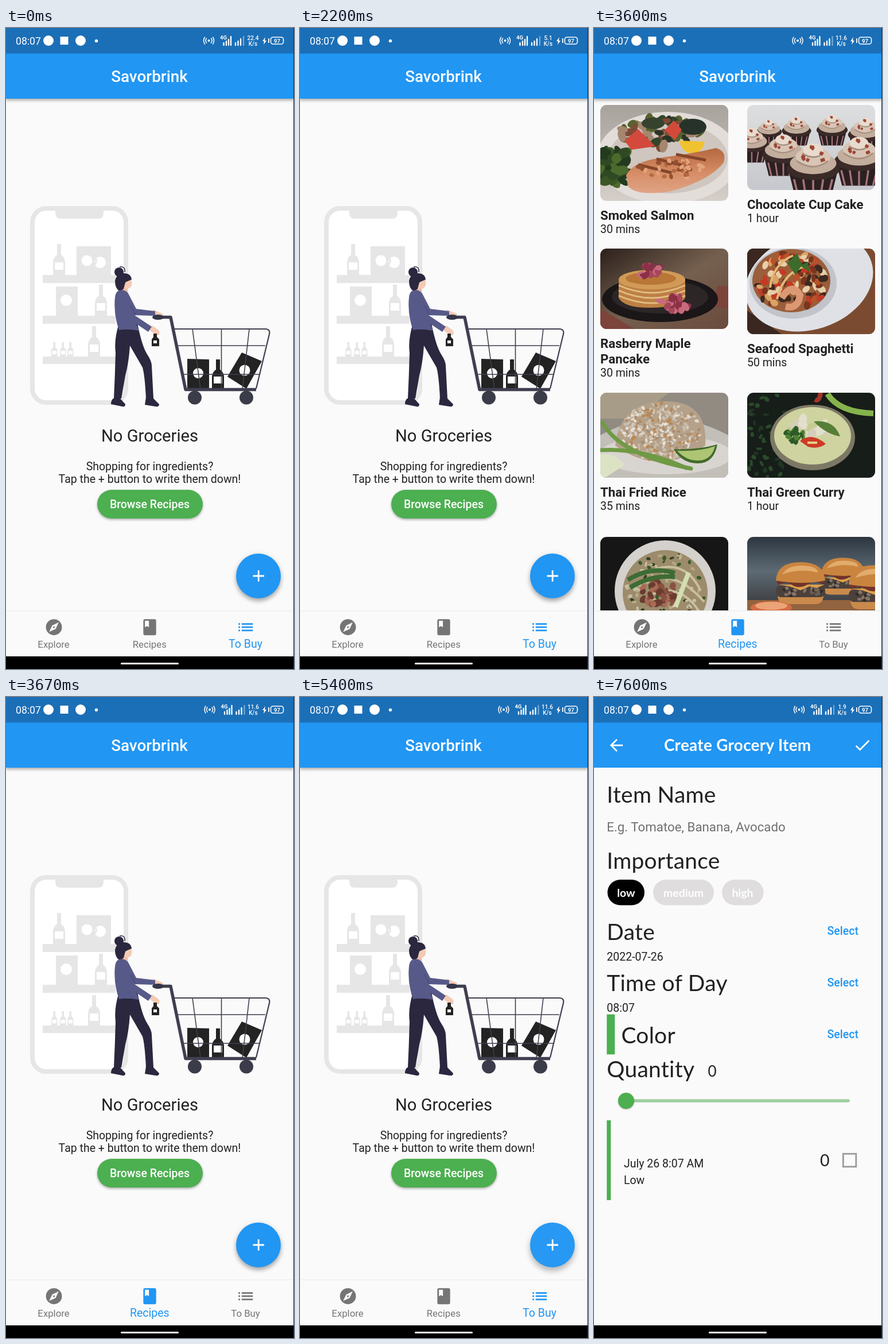
Recreate the animation shown at these times as an HTML page. Size 502x1116 px, loop 8 s.

```html
<!DOCTYPE html>
<html lang="en">
<head>
<meta charset="utf-8">
<title>Grocery app</title>
<style>
html, body { margin: 0; width: 100%; height: 100%; overflow: hidden; background: #fafafa; }
#stage { position: absolute; left: 0; top: 0; width: 502px; height: 1116px; overflow: hidden; background: #fafafa; font-family: Roboto, sans-serif; }
#stage > *, .layer > * { position: absolute; }
.layer { left: 0; top: 0; width: 502px; height: 1116px; }
svg { display: block; }
text { fill: #212121; font-size: 19.5px; }
.mid { text-anchor: middle; }
.med { font-weight: 500; }
.white { fill: #fff; }
.card { border-radius: 11px; }
.dish { font-size: 22.3px; font-weight: 700; }
.lato text, text.lato { font-family: Lato, sans-serif; }
.head text { font-size: 39px; letter-spacing: .25px; }
.chips text { font-weight: 700; fill: #fff; }
.bar { left: 0; top: 44px; width: 502px; height: 78.6px; background: #2196f3; }
#home { background: #fafafa; }

/* Timeline */
#home, #form, .speed, #signal, .nav, .nav text { animation: 8s step-end infinite; }
#home { animation-name: home; }
#form { animation-name: form; }
@keyframes home { 0%, 45.875% { visibility: visible } 28.375%, 92.5%, to { visibility: hidden } }
@keyframes form { 0%, to { visibility: hidden } 92.5% { visibility: visible } }

.speed { visibility: hidden; }
.speed text { font-size: 10px; font-weight: 500; fill: #fff; }
#s1 { animation-name: s1; } #s2 { animation-name: s2; }
#s3 { animation-name: s3; } #s4 { animation-name: s4; }
@keyframes s1 { 0% { visibility: visible } .875%, to { visibility: hidden } }
@keyframes s2 { 0%, 38.375%, to { visibility: hidden } .875% { visibility: visible } }
@keyframes s3 { 0%, 75%, to { visibility: hidden } 38.375% { visibility: visible } }
@keyframes s4 { 0%, to { visibility: hidden } 75% { visibility: visible } }
#signal { animation-name: signal; }
@keyframes signal { 0%, to { transform: none } .875%, 75% { transform: translateX(4px) } 38.375% { transform: translateX(1.5px) } }

.nav { color: #757575; fill: currentColor; }
.nav text { fill: currentColor; font-size: 16.75px; }
#tabRecipes { animation-name: recOn; } #tabRecipes text { animation-name: recBig; }
#tabBuy { animation-name: buyOn; } #tabBuy text { animation-name: buyBig; }
@keyframes recOn { 0%, 46.625%, to { color: #757575 } 29.125% { color: #2196f3 } }
@keyframes buyOn { 0%, 46.625%, to { color: #2196f3 } 29.125% { color: #757575 } }
@keyframes recBig { 0%, 46.625%, to { font-size: 16.75px } 29.125% { font-size: 19.5px } }
@keyframes buyBig { 0%, 46.625%, to { font-size: 19.5px } 29.125% { font-size: 16.75px } }

#fab { left: 401px; top: 915px; width: 78px; height: 78px; border-radius: 50%; overflow: hidden; background: #2196f3; animation: lift 8s linear infinite; }
#ink { position: absolute; inset: 0; border-radius: 50%; background: #fff; animation: ink 8s linear infinite; }
#fab svg { position: relative; }
@keyframes lift {
  0%, 59.125% { box-shadow: 0 5px 7px rgba(0,0,0,.28), 0 1px 12px rgba(0,0,0,.1) }
  63.375%, to { box-shadow: 0 7px 10px rgba(0,0,0,.22), 0 2px 16px rgba(0,0,0,.08) }
}
@keyframes ink {
  0%, 59.125% { transform: scale(0); opacity: .08 }
  63.375%, to { transform: none; opacity: .03 }
}
</style>
</head>
<body>
<div id="stage">

<svg width="0" height="0">
  <defs>
    <g id="bottle"><path d="M7 0h7v19q7 5 7 14v21H0V33q0-9 7-14z"/><path class="white" d="M3 32h15v13H3z"/></g>
    <g id="cake">
      <path d="M-30 4h60l-8 32h-44z" fill="#2b2020"/>
      <path d="M-23 16l5 20M-12 16l3 20M0 16v20M12 16l-3 20M23 16l-5 20" stroke="#a5727c" stroke-width="2.500"/>
      <ellipse cy="4" rx="32" ry="13" fill="#3a2a28"/>
      <ellipse cy="-3" rx="28" ry="13" fill="#c3ad9c"/>
      <ellipse cy="-11" rx="21" ry="11" fill="#d8c5b5"/>
      <ellipse cy="-19" rx="12" ry="8" fill="#e8dbce"/>
      <path d="M-20 -6q20 14 38 0M-13 -15q14 9 25 0" fill="none" stroke="#a8907f" stroke-width="2"/>
      <path d="M-14 -12l4 2m6-13l5 1m7 6l4 2m-20 6l3 2m14 0l5-2m-16-14l3 2m-14 10l3 3" stroke="#9c4636" stroke-width="4"/>
    </g>
    <g id="burger">
      <path d="M-40 22h80q0 16-14 16h-52q-14 0-14-16z" fill="#c98a4b"/>
      <rect x="-43" y="5" width="86" height="21" rx="9" fill="#4b403b"/>
      <g data-mix="0 16 38 8 24 7" data-colors="#6b5d55 #342b28 #857468"/>
      <path d="M-40 4h82l-14 6-12-3-16 7-20-7z" fill="#dda04a"/>
      <path d="M-40 2q14-9 26-1t26-1 28 1" fill="none" stroke="#70342a" stroke-width="7"/>
      <path d="M-43 -3q2-32 43-32t43 32q-40 8-86 0z" fill="#c9853f"/>
      <path d="M-32 -14q10-16 36-15t26 12q-30-8-62 3z" fill="#e2ac6c"/>
    </g>
    <linearGradient id="dusk" x2="0" y2="1"><stop stop-color="#2c3640"/><stop offset=".4" stop-color="#5d6a74"/><stop offset="1" stop-color="#2b2523"/></linearGradient>
    <linearGradient id="pale" x2="0" y2="1"><stop stop-color="#a7a29c"/><stop offset="1" stop-color="#d5cec9"/></linearGradient>
    <linearGradient id="cool" x2="0" y2="1"><stop stop-color="#dcdedf"/><stop offset="1" stop-color="#c6c8cd"/></linearGradient>
    <linearGradient id="warm" x2="1" y2="1"><stop stop-color="#2b201b"/><stop offset=".5" stop-color="#75604f"/><stop offset="1" stop-color="#6a4a3c"/></linearGradient>
    <linearGradient id="fish" x2="0" y2="1"><stop stop-color="#b5683f"/><stop offset=".55" stop-color="#d68d66"/><stop offset="1" stop-color="#e0a486"/></linearGradient>
  </defs>
</svg>

<div class="layer" id="recipes">
  <svg class="card" style="left:11px;top:134px" width="223" height="167">
    <rect width="223" height="167" fill="url(#pale)"/>
    <ellipse cx="118" cy="92" rx="124" ry="80" fill="#e3ddd9"/>
    <ellipse cx="118" cy="92" rx="104" ry="62" fill="#cfc6c0"/>
    <g data-mix="24 106 28 34 46 20" data-colors="#2f4a23 #4b6b2c #243a1e #3b5626"/>
    <g data-mix="105 48 76 24 56 18" data-colors="#33452a #59612f #2c3326 #a5876f #7d4a35"/>
    <ellipse cx="161" cy="38" rx="24" ry="14" fill="#27322a"/><ellipse cx="92" cy="32" rx="20" ry="10" fill="#35432e"/>
    <path d="M42 62l24-20 30 30-42 6zM112 44l16-17 14 16-12 18z" fill="#d34a3c"/>
    <path d="M138 62l44 2q-4 20-22 20t-22-22z" fill="#f1c22f"/>
    <path d="M45 122q12-24 66-31t90-16q20 5 14 25-24 32-95 51-58 8-72-10z" fill="url(#fish)"/>
    <path d="M66 104l58 14M98 94l58 14M132 86l52 10" stroke="#84452a" stroke-width="5"/>
    <g data-mix="125 112 65 16 36 9" data-colors="#b4693f #e2a37d #94512f"/>
  </svg>
  <svg class="card" style="left:267px;top:134px" width="223" height="148">
    <rect width="223" height="148" fill="url(#cool)"/>
    <use href="#cake" transform="translate(86 42) scale(.8)"/><use href="#cake" transform="translate(148 40) scale(.85)"/>
    <use href="#cake" transform="translate(206 48) scale(.95)"/><use href="#cake" transform="translate(38 44) scale(.7)"/>
    <use href="#cake" transform="translate(8 66) scale(.95)"/><use href="#cake" transform="translate(63 82) scale(1.15)"/>
    <use href="#cake" transform="translate(195 92) scale(1.35)"/><use href="#cake" transform="translate(115 106) scale(1.45)"/>
  </svg>
  <svg class="card" style="left:11px;top:384px" width="223" height="140">
    <rect width="223" height="140" fill="url(#warm)"/>
    <path d="M0 105l60 35H0zM205 65h18v40l-30-6z" fill="#7c443b"/>
    <ellipse cx="104" cy="88" rx="101" ry="40" fill="#1b1617"/>
    <ellipse cx="104" cy="84" rx="84" ry="29" fill="#2d2627"/>
    <path d="M32 54v32q10 18 58 17t58-17V54z" fill="#bd8044"/>
    <path d="M32 64q58 26 116 0M32 73q58 26 116 0M32 82q58 26 116 0" fill="none" stroke="#e2bc82" stroke-width="3"/>
    <ellipse cx="90" cy="54" rx="58" ry="17" fill="#d29a57"/><ellipse cx="88" cy="52" rx="44" ry="11" fill="#b87736"/>
    <g data-mix="87 39 22 10 18 13" data-colors="#a6465a #c76a7c #8b3047"/>
    <g data-mix="126 96 27 13 20 15" data-colors="#a6465a #c76a7c #8b3047"/>
  </svg>
  <svg class="card" style="left:267px;top:384px" width="223" height="149">
    <rect width="223" height="149" fill="#7b4b31"/>
    <path d="M0 0h80L30 60H0zM0 108l60 41H0z" fill="#392720"/>
    <ellipse cx="108" cy="58" rx="114" ry="83" fill="#dfe1e6" transform="rotate(-18 108 58)"/>
    <ellipse cx="80" cy="60" rx="76" ry="62" fill="#c2c4ca"/>
    <ellipse cx="77" cy="56" rx="68" ry="55" fill="#9b5e3a"/>
    <g data-mix="77 58 64 50 110 13" data-colors="#b7532b #d9a465 #e6cfa8 #79351f #c43a25 #3d2a20"/>
    <path d="M40 68q4-40 40-56m-28 76q12-50 54-58" fill="none" stroke="#e2b878" stroke-width="4"/>
    <path d="M60 86q18-28 32-5-3 25-25 20" fill="none" stroke="#dc9873" stroke-width="12"/>
    <path d="M70 25l17-17 9 20-12 18zM92 30l14-7 2 17z" fill="#3d6b2c"/>
  </svg>
  <svg class="card" style="left:11px;top:635px" width="223" height="148">
    <rect width="223" height="148" fill="#918b82"/>
    <path d="M0 0h120L60 45H0z" fill="#a79c87"/>
    <path d="M0 74q110-60 223 0v74H0z" fill="#c2bfb9"/>
    <ellipse cx="114" cy="108" rx="116" ry="34" fill="#d8d5d0"/>
    <path d="M26 92q8-75 85-77t72 77q-80 56-157 0z" fill="#b5a18a"/>
    <g data-mix="105 68 70 50 340 6" data-colors="#d9cfc1 #c8b8a2 #e6e0d5 #a98d72 #bb8752 #c9bfb2"/>
    <path d="M4 52q30 56 154 80M0 100q70-5 150 31" fill="none" stroke="#6f9a45" stroke-width="7" stroke-linecap="round"/>
    <path d="M0 108q26-5 42 18L8 148H0z" fill="#dce3c4"/>
    <path d="M128 98q40 2 76-8-6 33-34 33t-42-25z" fill="#426b2b"/><path d="M134 101q38 2 66-8-6 24-28 25t-38-17z" fill="#aec575"/>
  </svg>
  <svg class="card" style="left:267px;top:635px" width="223" height="148">
    <rect width="223" height="148" fill="#171d18"/>
    <g data-mix="35 74 55 75 110 9" data-colors="#203424 #2a4a2a #142018"/>
    <path d="M140 2q20 32 80 34" fill="none" stroke="#86b34b" stroke-width="10"/>
    <path d="M118 12q8 4 10-12" fill="none" stroke="#a63427" stroke-width="8"/>
    <ellipse cx="114" cy="78" rx="74" ry="57" fill="#7d7866"/>
    <ellipse cx="114" cy="75" rx="67" ry="50" fill="#cfd3a0"/>
    <g data-mix="112 64 36 20 26 17" data-colors="#e3dfcd #d5ceb9 #c4cc8f"/>
    <g data-mix="83 74 16 12 22 10" data-colors="#2e5a27 #4f8235"/>
    <path d="M92 84q20-16 45 5-13 10-31 5z" fill="#cd3a25"/><path d="M105 87h17" stroke="#e4cf88" stroke-width="4"/>
    <path d="M116 50q35-4 46 26-25-4-46-26z" fill="#577e37"/>
  </svg>
  <svg class="card" style="left:11px;top:886px" width="223" height="149">
    <rect width="223" height="149" fill="#171616"/>
    <circle cx="113" cy="94" r="88" fill="#d4d1cc"/><circle cx="113" cy="97" r="74" fill="#9c8c6c"/>
    <g data-mix="113 95 68 68 110 7" data-colors="#395a2c #b7a987 #c8bda0 #2e3f26"/>
    <path d="M75 64q70-34 100 30M66 85q58-38 115 28M72 110q60-40 100 19" fill="none" stroke="#c9bf9f" stroke-width="4"/>
    <g data-mix="103 98 33 22 44 12" data-colors="#8a5140 #a86a55 #6b3b30"/>
    <path d="M48 75q40-25 82-12M52 88q40-23 78-18" fill="none" stroke="#3e6b34" stroke-width="8"/>
    <path d="M154 62l-23 60" stroke="#d3deb0" stroke-width="8"/>
  </svg>
  <svg class="card" style="left:267px;top:886px" width="223" height="149">
    <rect width="223" height="149" fill="url(#dusk)"/>
    <path d="M0 110h223v39H0z" fill="#92633f"/>
    <use href="#burger" transform="translate(167 67) scale(.88)"/><use href="#burger" transform="translate(93 79)"/>
    <use href="#burger" transform="translate(222 86) scale(1.05)"/>
    <ellipse cx="42" cy="123" rx="36" ry="11" fill="#d66b42"/><ellipse cx="42" cy="120" rx="28" ry="7" fill="#eaa376"/>
  </svg>
  <svg width="502" height="1016">
    <text class="dish" x="11" y="334">Smoked Salmon</text><text x="11" y="357">30 mins</text>
    <text class="dish" x="267" y="315">Chocolate Cup Cake</text><text x="267" y="338">1 hour</text>
    <text class="dish" x="11" y="557">Rasberry Maple</text><text class="dish" x="11" y="583.5">Pancake</text><text x="11" y="607">30 mins</text>
    <text class="dish" x="267" y="565.5">Seafood Spaghetti</text><text x="267" y="589">50 mins</text>
    <text class="dish" x="11" y="816">Thai Fried Rice</text><text x="11" y="839">35 mins</text>
    <text class="dish" x="267" y="816">Thai Green Curry</text><text x="267" y="839">1 hour</text>
  </svg>
</div>

<div class="layer" id="home">
  <svg width="502" height="1016">
    <rect x="46" y="314" width="163" height="338" rx="24" fill="#fff" stroke="#e6e6e6" stroke-width="8"/>
    <g fill="#e6e6e6">
      <path d="M86 316h84v6q0 10-10 10H96q-10 0-10-10zM64 430h127v14H64zM64 501h127v14H64zM64 572h127v13H64zM123 380h60v50h-60zM87 450h38v51H87z"/>
      <use href="#bottle" x="82" y="376"/><use href="#bottle" x="155" y="447"/><use href="#bottle" x="143" y="519"/>
      <use href="#bottle" transform="translate(79 547) scale(.5 .47)"/><use href="#bottle" transform="translate(94 547) scale(.5 .47)"/><use href="#bottle" transform="translate(107 547) scale(.5 .47)"/>
    </g>
    <g class="white"><circle cx="141" cy="405" r="9.5"/><circle cx="164" cy="408" r="10"/><circle cx="105" cy="474" r="10"/></g>
    <path d="M152 397q10 8 1 16" fill="none" stroke="#e6e6e6" stroke-width="3"/>

    <g fill="#232323">
      <path d="M316 576l38 1v50h-38zM411 565l35 15-27 48-33-21z"/>
      <use href="#bottle" transform="translate(359 577) scale(1 .93)"/>
    </g>
    <circle class="white" cx="335" cy="601" r="9"/><circle class="white" cx="416" cy="596" r="9.5"/>
    <g fill="none" stroke="#3f3f50">
      <path d="M293 524h160q8 1 6 9l-23 95" stroke-width="2.2"/>
      <path d="M299 553h153M309 603h133M325 524l14 105M375.500 524v105M424 524l-12 105" stroke-width="1.6"/>
      <path d="M272 503.500h15l26 126h123" stroke-width="5.500" stroke-linejoin="round"/>
    </g>
    <g fill="#3b3c49"><circle cx="329" cy="643.500" r="12"/><circle cx="419" cy="643.500" r="12"/></g>

    <path d="M201 446h11v18h-12z" fill="#eabfa8"/>
    <ellipse cx="212" cy="444" rx="7.500" ry="10" fill="#f3cbb5"/>
    <g fill="#2a273f">
      <circle cx="197" cy="425" r="8"/>
      <path d="M198 416q10-2 9 9" fill="none" stroke="#2a273f" stroke-width="1.500"/>
      <path d="M190 441q2-14 15-14 13 0 14 11-8 3-11 5l-3 11-6 5q-9-5-9-18z"/>
      <path d="M197 514h32q8 40 17 54 8 12 8 20l3 57h-13q-2-40-6-54l-22-38q-2 30-8 52l-7 40h-13q2-40 3-80-3-22 6-51z"/>
      <path d="M187 645h12l9 10q0 5-5 4l-20-4q0-7 4-10zM244 643h11l12 12q0 5-6 4l-19-3z"/>
    </g>
    <path d="M247 523l8-5 11 8q4 7-1 9l-10-5zM256 490l11 5q8 2 7 5l-17 2z" fill="#f3cbb5"/>
    <path d="M197 457q10-3 16 5l14 27 33 4v8l-36-1 30 20-6 9-21-14 3 7 1 5q-19-4-34-1-10-28-7-57 1-10 7-12z" fill="#575a89"/>
    <path d="M217 483l9 17" stroke="#484b78" stroke-width="1.500"/>
    <ellipse cx="265" cy="503.500" rx="10" ry="4.500" fill="#35364a"/>
    <path d="M257 532h6v6l4 4v12h-13v-12l3-4z" fill="#232323"/><path class="white" d="M257 544h6v5h-6z"/>

    <text class="mid" x="250.500" y="720" style="font-size:29.200px">No Groceries</text>
    <text class="mid" x="250.500" y="769.500">Shopping for ingredients?</text>
    <text class="mid" x="250.500" y="792">Tap the + button to write them down!</text>
    <rect x="159" y="804" width="184" height="50" rx="25" fill="#4caf50" style="filter:drop-shadow(0 2px 2px rgba(0,0,0,.32))"/>
    <text class="mid med white" x="250.500" y="836">Browse Recipes</text>
  </svg>
  <div id="fab">
    <div id="ink"></div>
    <svg width="78" height="78"><path d="M29.500 39h19.500M39.200 29.300v19.500" stroke="#fff" stroke-width="2.800"/></svg>
  </div>
</div>

<div class="bar" style="box-shadow:0 3px 5px rgba(0,0,0,.32)"></div>
<svg class="layer" width="502" height="1116">
  <text class="mid med white" x="250" y="94" style="font-size:27.900px">Savorbrink</text>
  <path d="M0 1015h502v79H0z" fill="#fafafa"/><path d="M0 1014h502v1.500H0z" fill="#efefef"/>
  <g class="nav">
    <path transform="translate(66.800 1026.500) scale(1.394)" d="M12 10.900a1.100 1.100 0 1 0 0 2.200 1.100 1.100 0 0 0 0-2.200zM12 2a10 10 0 1 0 0 20 10 10 0 0 0 0-20zm2.190 12.190L6 18l3.810-8.190L18 6z"/>
    <text class="mid" x="83" y="1079">Explore</text>
  </g>
  <g class="nav" id="tabRecipes">
    <path transform="translate(233.800 1026.500) scale(1.394)" d="M18 2H6a2 2 0 0 0-2 2v16a2 2 0 0 0 2 2h12a2 2 0 0 0 2-2V4a2 2 0 0 0-2-2zM6 4h5v8l-2.500-1.500L6 12z"/>
    <text class="mid" x="250.300" y="1078.500">Recipes</text>
  </g>
  <g class="nav" id="tabBuy">
    <path transform="translate(401 1026.500) scale(1.394)" d="M3 13h2v-2H3zm0 4h2v-2H3zm0-8h2V7H3zm4 4h14v-2H7zm0 4h14v-2H7zM7 7v2h14V7z"/>
    <text class="mid" x="417.500" y="1078.500">To Buy</text>
  </g>
</svg>

<div class="layer" id="form">
  <div style="left:0;top:122px;width:502px;height:972px;background:#fafafa"></div>
  <div class="bar"></div>
  <svg width="502" height="1094">
    <g class="white">
      <path transform="translate(22.300 67.300) scale(1.394)" d="M20 11H7.830l5.590-5.590L12 4l-8 8 8 8 1.410-1.410L7.830 13H20z"/>
      <path transform="translate(451 67.300) scale(1.394)" d="M9 16.170L4.830 12l-1.420 1.410L9 19 21 7l-1.410-1.410z"/>
    </g>
    <text class="lato mid white" x="250.200" y="94" style="font-size:27.900px;font-weight:700;letter-spacing:.3px">Create Grocery Item</text>
    <g class="lato head">
      <text x="22.300" y="184">Item Name</text><text x="22.300" y="299">Importance</text><text x="22.300" y="423">Date</text>
      <text x="22.300" y="512">Time of Day</text><text x="47.400" y="603">Color</text><text x="22.300" y="662">Quantity</text>
    </g>
    <text x="22.300" y="234" style="font-size:22.300px;fill:#707070">E.g. Tomatoe, Banana, Avocado</text>
    <rect x="23.500" y="318" width="64.500" height="44.500" rx="22.200"/>
    <g fill="#dfdddd"><rect x="103" y="318" width="106" height="44.500" rx="22.200"/><rect x="223" y="318" width="72.500" height="44.500" rx="22.200"/></g>
    <g class="lato chips"><text class="mid" x="56" y="347.500">low</text><text class="mid" x="156" y="347.500">medium</text><text class="mid" x="259" y="347.500">high</text></g>
    <g class="med" text-anchor="end">
      <text x="461" y="414" style="fill:#2196f3">Select</text><text x="461" y="503.500" style="fill:#2196f3">Select</text><text x="461" y="594" style="fill:#2196f3">Select</text>
    </g>
    <text x="22.300" y="459">2022-07-26</text><text x="22.300" y="548">08:07</text>
    <path d="M22.300 552.500h14v69.700h-14zM22.300 737h7v139h-7z" fill="#4caf50"/>
    <text class="lato" x="198.500" y="661" style="font-size:26px">0</text>
    <path d="M56 703h387" stroke="#9dcf9f" stroke-width="5.600" stroke-linecap="round"/>
    <circle cx="56" cy="703" r="14" fill="#4caf50" style="filter:drop-shadow(0 1px 1px rgba(0,0,0,.3))"/>
    <text x="52" y="819">July 26 8:07 AM</text><text x="52" y="848">Low</text>
    <text class="lato" x="394" y="817" style="font-size:28.500px">0</text>
    <rect x="434.300" y="795.300" width="22.500" height="22.500" fill="none" stroke="#9a9a9a" stroke-width="2.800"/>
  </svg>
</div>

<svg class="layer" width="502" height="1116">
  <path d="M0 0h502v44.500H0z" fill="#1b6fb7"/>
  <g class="white">
    <text class="white" x="17" y="29" style="font-size:17.600px">08:07</text>
    <circle cx="74" cy="22" r="9"/><rect x="94.500" y="15" width="14" height="14"/><circle cx="130" cy="22" r="9"/><circle cx="157.500" cy="22.500" r="2.700"/>
    <g id="signal">
      <circle cx="353.500" cy="22" r="2"/>
      <path d="M349.500 18q-3 4 0 8m8-8q3 4 0 8M346.500 16q-4 6 0 12m14-12q4 6 0 12" fill="none" stroke="#fff" stroke-width="1.500" stroke-linecap="round"/>
      <text class="white" x="373" y="19.500" style="font-size:9.500px;font-weight:700">4G</text>
      <path d="M379.500 30v-4m4.500 4v-7m4 7V20m4 10V15M400 30v-4m4.500 4v-7m4.500 7V19" stroke="#fff" stroke-width="2.300" stroke-linecap="round"/>
      <path d="M414 30V15" stroke="#fff" stroke-width="2.300" stroke-linecap="round" opacity=".4"/>
    </g>
    <g class="speed mid" id="s1"><text x="430.500" y="21">22.4</text><text x="430.500" y="31">K/s</text></g>
    <g class="speed mid" id="s2"><text x="432.500" y="21">5.1</text><text x="432.500" y="31">K/s</text></g>
    <g class="speed mid" id="s3"><text x="431" y="21">11.6</text><text x="431" y="31">K/s</text></g>
    <g class="speed mid" id="s4"><text x="432.500" y="21">1.9</text><text x="432.500" y="31">K/s</text></g>
    <path d="M452 16l-5 7h3l-1 6 5-7h-3zM457 18h1.800v8H457z"/>
    <rect x="461.500" y="16" width="22" height="12" rx="4" fill="none" stroke="#fff" stroke-width="1.600"/>
    <text class="mid white" x="472.500" y="25.500" style="font-size:9.500px;font-weight:700">97</text>
  </g>
  <path d="M0 1094h502v22H0z"/>
  <rect class="white" x="200" y="1105" width="101" height="3" rx="1.500"/>
  <path d="M501 0h1v1116h-1z" fill="#2a2a2a"/>
</svg>
</div>

<script>
// Fills an ellipse with small seeded blobs: cx cy rx ry count size
let seed = 7;
const rand = () => (seed = seed * 16807 % 2147483647) / 2147483647;
for (const g of document.querySelectorAll('[data-mix]')) {
  const [cx, cy, rx, ry, count, size] = g.dataset.mix.split(' ').map(Number);
  const colors = g.dataset.colors.split(' ');
  for (let i = 0; i < count; i++) {
    const a = rand() * Math.PI * 2, d = Math.sqrt(rand());
    const x = cx + Math.cos(a) * d * rx, y = cy + Math.sin(a) * d * ry;
    const blob = document.createElementNS('http://www.w3.org/2000/svg', 'ellipse');
    const set = (k, v) => blob.setAttribute(k, v);
    set('cx', x);
    set('cy', y);
    set('rx', size * (.45 + rand() * .2));
    set('ry', size * (.25 + rand() * .2));
    set('transform', `rotate(${rand() * 180} ${x} ${y})`);
    set('fill', colors[Math.floor(rand() * colors.length)]);
    g.append(blob);
  }
}
</script>
</body>
</html>
```
